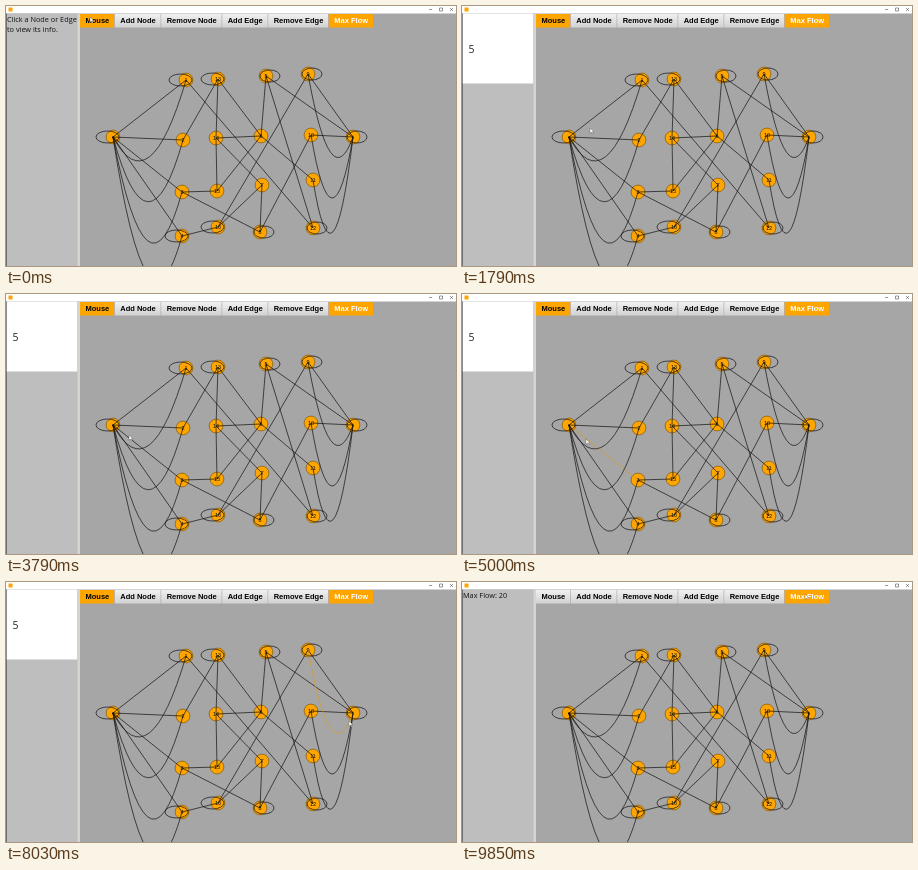
These frames come from a looping animation (450 by 260 pixels, 9880 ms). An HTML page:

```html
<!DOCTYPE html>
<html lang="en">
<head>
<meta charset="utf-8">
<title>Flow network editor</title>
<style>
  html, body { margin: 0; width: 100%; height: 100%; overflow: hidden; background: #a6a6a6; }
  svg { display: block; width: 450px; height: 260px; }
  .btn { font: bold 7.5px "Liberation Sans", Arial, sans-serif; text-anchor: middle; }
  .info { font: 7.3px "Open Sans", "Noto Sans", sans-serif; fill: #111; }
  .value { font: 10.5px "Open Sans", "Noto Sans", sans-serif; fill: #222; }
  .label { font: 5.5px "Liberation Sans", Arial, sans-serif; text-anchor: middle; fill: #111; }
  .edge { fill: none; stroke: #111; stroke-width: .7; }
  .edge.hot { stroke: #dc9a22; }
</style>
</head>
<body>
<svg id="stage" viewBox="0 0 450 260" xmlns="http://www.w3.org/2000/svg">
  <linearGradient id="grey" x2="0" y2="1">
    <stop stop-color="#f0f0f0"/><stop offset="1" stop-color="#d2d2d2"/>
  </linearGradient>
</svg>
<script>
const LOOP = 9880, PICK = 1150, SOLVE = 9250;
const ORANGE = '#ffa500', GREY = 'url(#grey)';
const stage = document.getElementById('stage');

function add(tag, attrs, text) {
  const el = document.createElementNS('http://www.w3.org/2000/svg', tag);
  for (const key in attrs) el.setAttribute(key, attrs[key]);
  if (text !== undefined) el.textContent = text;
  return stage.appendChild(el);
}
const rect = (x, y, width, height, fill) => add('rect', { x, y, width, height, fill });
const text = (x, y, cls, str) => add('text', { x, y, class: cls }, str);
const show = (el, on) => el.setAttribute('visibility', on ? 'visible' : 'hidden');

// Window and side panel
rect(0, 0, 450, 260, '#a6a6a6');
rect(0, 0, 450, 7.5, '#fff');
rect(2.5, 1.5, 4, 4, ORANGE);
add('path', {
  d: 'M423 3.5h3M433.5 2h3v3h-3zM444 2l3 3m0-3l-3 3',
  fill: 'none', stroke: '#555', 'stroke-width': .6
});
rect(0, 7.5, 72, 252.5, '#bebebe');
rect(0, 7.5, .8, 252.5, '#5a5a5a');
rect(71.5, 7.5, 2.5, 252.5, '#d8d4ce');
const hint = [
  text(1, 16, 'info', 'Click a Node or Edge'),
  text(1, 25.5, 'info', 'to view its info.')
];
const card = [rect(.8, 7.5, 70.4, 70, '#fff'), text(6.5, 46.5, 'value', '5')];
const result = text(1, 16, 'info', 'Max Flow: 20');

// Toolbar: each button is its label plus padding
let left = 74;
const buttons = ['Mouse', 'Add Node', 'Remove Node', 'Add Edge', 'Remove Edge', 'Max Flow'].map(name => {
  const box = rect(left, 8, 0, 13.5, GREY);
  const label = text(0, 17.4, 'btn', name);
  const width = label.getComputedTextLength() + 11;
  box.setAttribute('width', width - .6);
  label.setAttribute('x', left + width / 2);
  left += width;
  return { box, label };
});
const mouse = buttons[0], solve = buttons[5];
solve.box.setAttribute('fill', ORANGE);
solve.label.setAttribute('fill', '#fff');

// Graph: node 0 is the start, node 17 the end
const END = 17;
const nodes = [
  [107, 131], [180, 74], [177, 134], [176, 186], [176, 230],
  [260, 70], [255, 130], [256, 179], [254, 226],
  [302, 68], [305, 129], [307, 174], [307, 222],
  [212, 73], [210, 132], [211, 185], [212, 221], [347, 131]
];
const walks = '1-0-2-13-6-11 3-0-4-16-7-8 13-14-15-6-14-7 15-3-8-10-17 16-9-17 6-5-12-1 5-17';
const looped = [0, 1, 4, 5, 8, 9, 12, 13, 16, END];

nodes.forEach(([cx, cy], id) => {
  add('circle', { cx, cy, r: 6.9, fill: ORANGE, stroke: '#6b4a08', 'stroke-width': .6 });
  text(cx, cy + 2, 'label', id === 0 ? 's' : id === END ? 't' : id);
});

// Self loops point away from the middle of the graph
for (const id of looped) {
  const [x, y] = nodes[id], shift = x < 230 ? -5.5 : 4;
  add('ellipse', { cx: x + shift, cy: y, rx: 6 + Math.abs(shift), ry: 6, class: 'edge' });
}

// Edges keep points along their length for hit testing
const edges = [];
function edge(d) {
  const el = add('path', { d, class: 'edge' });
  const points = [];
  for (let s = 0; s < el.getTotalLength(); s++) points.push(el.getPointAtLength(s));
  edges.push({ el, points });
}
function arc(end, outer) {
  const [x, y] = nodes[end], [u, v] = nodes[outer];
  edge(`M${x} ${y}Q${(x + u) / 2} ${v + 125} ${u} ${v}`);
}
for (const walk of walks.split(' ')) {
  walk.split('-').forEach((id, i, ids) => i && edge(`M${nodes[ids[i - 1]]}L${nodes[id]}`));
}
for (let id = 1; id <= 4; id++) arc(0, id);
for (let id = 9; id <= 11; id++) arc(END, id);

const cursor = add('path', {
  d: 'M0 0V5.2L1.3 4.1 2.2 6 3.1 5.6 2.3 3.8H3.9Z',
  fill: '#fff', stroke: '#444', 'stroke-width': .35
});

// Pointer rests: time, x, y
const rests = [
  [0, 84, 11], [1200, 126, 116], [1790, 128, 122], [3790, 123, 141], [5060, 124, 145],
  [6400, 126, 159], [7050, 126, 159], [7950, 343, 139], [8400, 343, 139], [9200, 343, 12], [LOOP, 343, 12]
];

function pointer(t) {
  const i = rests.findIndex(r => r[0] > t);
  const [t0, x0, y0] = rests[i - 1], [t1, x1, y1] = rests[i];
  const k = (t - t0) / (t1 - t0), e = k * k * (3 - 2 * k);
  return [x0 + (x1 - x0) * e, y0 + (y1 - y0) * e];
}

function nearest(x, y) {
  let best = null, reach = 1.6;
  for (const { el, points } of edges) {
    for (const p of points) {
      const d = Math.hypot(p.x - x, p.y - y);
      if (d < reach) { reach = d; best = el; }
    }
  }
  return best;
}

function draw(t) {
  const picked = t >= PICK, solved = t >= SOLVE;
  hint.forEach(el => show(el, !picked));
  card.forEach(el => show(el, picked && !solved));
  show(result, solved);
  mouse.box.setAttribute('fill', solved ? GREY : ORANGE);
  const [x, y] = pointer(t), hot = nearest(x, y);
  for (const { el } of edges) el.classList.toggle('hot', el === hot);
  cursor.setAttribute('transform', `translate(${x} ${y})`);
}

const start = performance.now();
function tick() {
  draw((performance.now() - start) % LOOP);
  requestAnimationFrame(tick);
}
tick();
</script>
</body>
</html>
```
